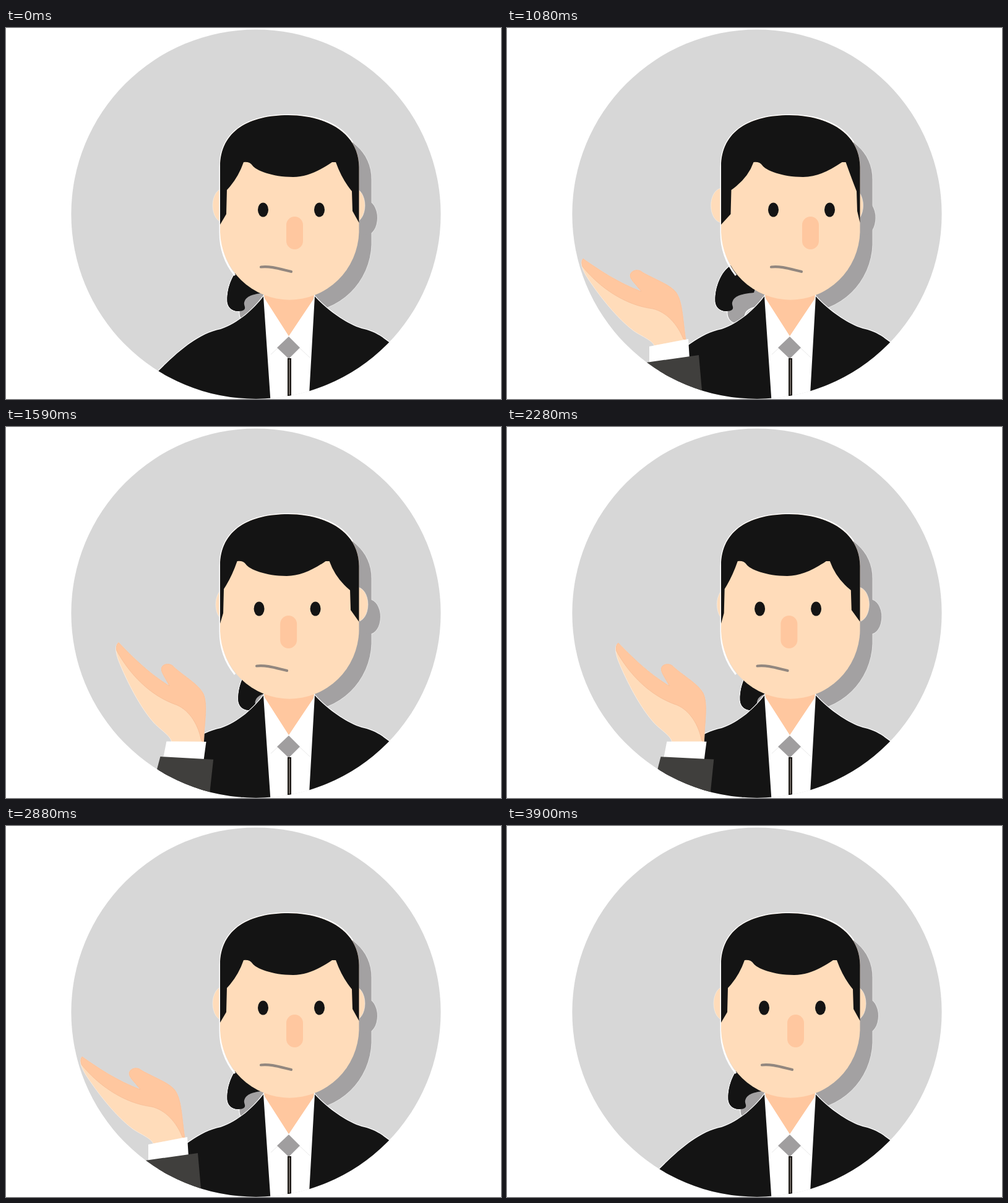
Animation, 800 px wide and 600 px high, one loop 4.5 s. Source, as an HTML page:

```html
<!DOCTYPE html>
<html lang="en">
<head>
<meta charset="utf-8">
<title>Puzzled man</title>
<style>
html, body { margin: 0; width: 100%; height: 100%; overflow: hidden; background: #fff; }
svg { display: block; width: 100%; height: 100%; }
.halo { stroke: #fff; stroke-width: 2.4; paint-order: stroke; }
.shade { fill: #a3a1a2; }
.dark { fill: #141414; }
.skin { fill: #ffdcba; }
.blush { fill: #ffc79f; }
</style>
</head>
<body>
<svg viewBox="0 0 800 600">
  <defs>
    <clipPath id="disc"><circle cx="404" cy="301.2" r="298.6"/></clipPath>
    <path id="skull" d="M346 330V225C346 165 395 141 456 141S570.5 170 570.5 225V330A112.3 113 0 0 1 346 330Z"/>
    <g id="ears"><ellipse cx="352" cy="287" rx="18" ry="28"/><ellipse cx="562" cy="287" rx="18" ry="28"/></g>
    <path id="tail" d="M383 384C366 395 357.500 420 357.500 440C357.500 453 367 458 376 458C384 458 387 455 386 451C385 447 384 445 386 441C390 433 400 430 420 428L430 395Z"/>
  </defs>
  <g clip-path="url(#disc)">
    <rect width="800" height="600" fill="#d7d7d7"/>

    <use href="#tail" class="halo"/>
    <g class="shade" transform="translate(20 20)">
      <g stroke="#e6e6e6" stroke-width="1.500"><use href="#skull"/><use href="#ears"/></g>
      <use href="#tail" class="halo"/>
      <use href="#skull"/><use href="#ears"/>
    </g>

    <use href="#tail" class="dark"/>
    <path class="blush" d="M417 425H498V437L457 498L417 437Z"/>
    <use href="#ears" class="skin" stroke="#f4ece4" stroke-width=".7"/>
    <path d="M370 400Q346 370 346 330V225C346 165 395 141 456 141Q530 141 560 185" fill="none" stroke="#fff" stroke-width="3"/>
    <use href="#skull" class="skin"/>
    <path id="hair" class="dark"/>

    <g id="eyes" class="dark">
      <ellipse cx="415.500" cy="294" rx="8.500"/><ellipse cx="506.500" cy="294" rx="8.500"/>
    </g>
    <rect id="nose" class="blush" x="453" y="305" width="27" height="53" rx="13.500"/>
    <path id="mouth" d="M412 386.500C428 385 440 389 461 394" fill="none" stroke="#92877f" stroke-width="4.200" stroke-linecap="round"/>

    <path fill="#fff" d="M416 434L457 498L499 434L490 600H427Z"/>
    <path class="blush" d="M418 437Q458 450 498 437L457 498Z"/>
    <path d="M428 528L440 517M474 517L491 533" stroke="#e9e9e9"/>
    <path fill="#a09e9f" d="M457 499L475 517L457 535L438 517Z"/>
    <path d="M458 534V595" stroke="#1c1916" stroke-width="6"/>
    <path d="M458 536V593" stroke="#b9afa5"/>
    <path class="dark halo" d="M416 434C400 455 376 477 347 487C310 494 275 526 247 554L200 610H428Z"/>
    <path class="dark halo" d="M499 434C516 453 548 478 575 486C598 491 608 500 619 508L650 610H489Z"/>

    <g id="arm">
      <path class="skin" stroke="#fbeee2" stroke-width=".8" d="M123 373C150 392 180 412 217 426C206 412 198 406 199 399C201 391 213 389 219 395C240 407 262 414 273 427C284 442 284 470 289 504L238 514C235 505 218 499 205 490C178 470 148 432 128 401C120 387 118 378 123 373Z"/>
      <path class="blush" stroke="#f3b891" stroke-width=".6" d="M123 373C150 392 180 412 217 426C206 412 198 406 199 399C201 391 213 389 219 395C240 407 262 414 273 427C284 442 284 470 289 504L285 503C276 480 258 459 235 454C190 448 150 420 122 386Q119 377 123 373Z"/>
      <path fill="#fff" d="M230 515L293 503L295 535L230 543Z"/>
      <path fill="#403f3d" d="M225 541L310 529L325 700H215Z"/>
    </g>
  </g>
</svg>
<script>
const $ = id => document.getElementById(id);
const move = (id, x) => $(id).setAttribute('transform', `translate(${x} 0)`);

// Symmetric power ease from 0 to 1
function ease(t, start, length, n) {
  const x = Math.min(1, Math.max(0, (t - start) / length));
  return x < .5 ? (2 * x) ** n / 2 : 1 - (2 - 2 * x) ** n / 2;
}

function hairPath(a, l, r) {
  return `M346 318V225C346 165 395 141 456 141S570.5 170 570.5 225V315
    L${560 + r} 296 ${559 + r} 264Q${543 + a} 245 ${533 + a} 217H${527 + a}
    C${505 + a} 232 ${485 + a} 241 ${464 + a} 241
    C${430 + a} 241 ${403 + a} 230 ${398 + a} 222
    Q${394 + a} 216 ${384 + a} 217Q${375 + a} 243 ${357 + l} 262L${356 + l} 301Z`;
}

function draw(t) {
  const entry = t < 420 ? t : Math.max(420, t - 90); // pauses during the first blink
  const enter = ease(entry, 30, 660, 4);
  const lift = ease(t, 1050, 780, 3);
  const drop = ease(t, 1980, 900, 3);
  const leave = ease(t, 3180, 570, 3);

  // Head turn: 1 is fully to the right, negative is to the left
  const turn = enter - 2.25 * lift + 1.25 * drop;
  const shift = (left, right) => turn < 0 ? -turn * left : turn * right;
  move('eyes', shift(-6.5, 15));
  move('nose', shift(-10, 24));
  move('mouth', shift(-7, 15));
  move('ears', shift(5, -4.5));
  move('tail', shift(18, -21));
  $('hair').setAttribute('d', hairPath(shift(-10.5, 14.5), shift(-5, 5.5), shift(-3, 6)));

  const blink = t >= 420 && t < 540 || t >= 3750 && t < 3900;
  for (const eye of $('eyes').children) eye.setAttribute('ry', blink ? 2.6 : 11.5);

  // The forearm swings around an elbow below the stage
  const away = 1 - enter + leave, up = lift - drop;
  const x = 35 * away ** 3 + 3.5 * up, y = 60 * away ** 3 - 10 * up;
  $('arm').setAttribute('transform',
    `translate(${x} ${y}) rotate(${110 * away + 12.7 * up} 231 650)`);
}

const begin = performance.now();
function tick() {
  const t = (performance.now() - begin) % 4500;
  draw(Math.floor(t / 30) * 30);
  requestAnimationFrame(tick);
}
tick();
</script>
</body>
</html>
```
